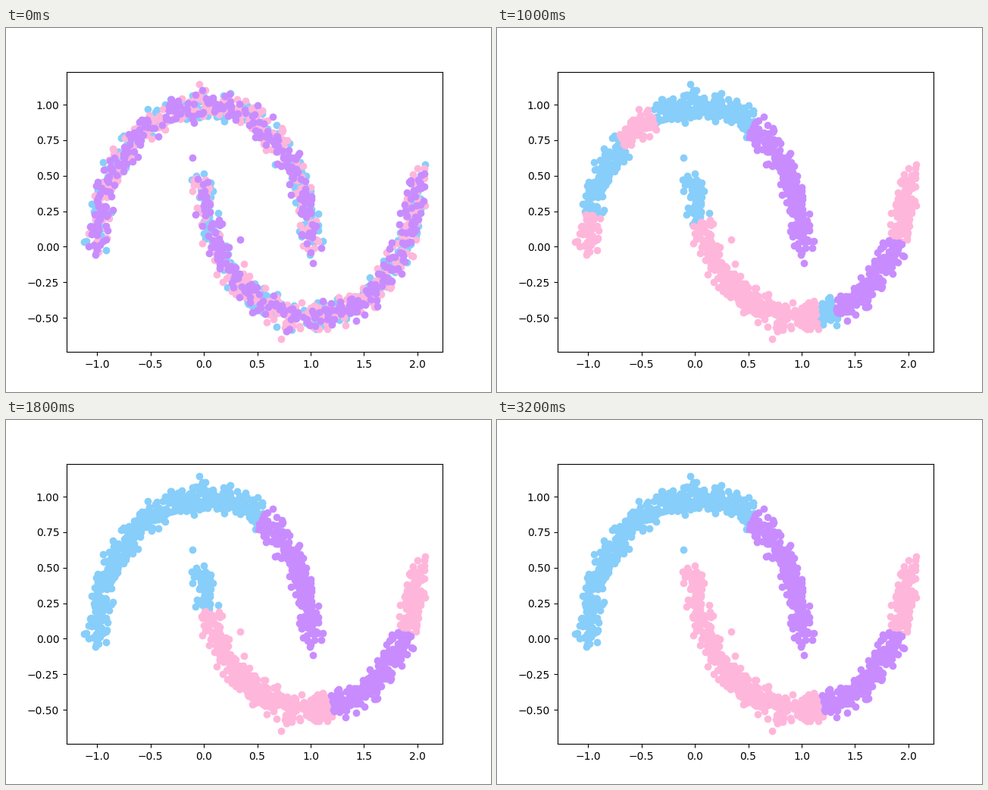
Recreate the animation shown at these times as a matplotlib script. Size 640 px wide and 480 px high, loop 3.4 s.

```python
import numpy as np
import matplotlib.pyplot as plt
from matplotlib.animation import FuncAnimation

FRAMES, INTERVAL = 17, 200
BLUE, PINK, PURPLE = range(3)
COLORS = ["#87cefa", "#ffb6db", "#c88cff"]
XLIM, YLIM = (-1.2853, 2.2349), (-0.7402, 1.2318)
COUNT, NOISE = 750, 0.049

rng = np.random.RandomState(7)


def make_moon(lower, strays):
    """Return a noisy half circle, arched up or (lower) hanging down."""
    t = np.linspace(0, np.pi, COUNT)
    sign = -1 if lower else 1
    points = np.column_stack([lower - np.cos(t),
                              0.5 * lower + sign * np.sin(t)])
    points += rng.normal(scale=NOISE, size=points.shape)
    radius, angle = polar(points, lower)
    inside = (abs(radius - 1) < 0.125) & (abs(angle - 90) < 94)
    inside &= (points[:, 0] > -1.12) & (points[:, 0] < 2.075)
    return np.vstack([points[inside], strays])


def polar(points, lower):
    """Distance from the moon's centre, and degrees from its left tip."""
    dx = lower - points[:, 0]
    dy = 0.5 - points[:, 1] if lower else points[:, 1]
    angle = np.degrees(np.arctan2(dy, dx))
    return np.hypot(dx, dy), (angle + 90) % 360 - 90


def glide(frame, start, end, last, power=2):
    """Move a colour border from start to end degrees, speeding up."""
    progress = np.clip((frame - 1) / (last - 1), 0, 1)
    return start + (end - start) * progress ** power


def upper_borders(frame):
    return [glide(frame, 19.5, -15, 8, 3),
            glide(frame, 40, 56, 7),
            glide(frame, 75, 56, 7),
            glide(frame, 115.5, 122.5, 5)]


def lower_borders(frame):
    return [glide(frame, 19, -5.5, 16, 4),
            glide(frame, 96, 102, 7),
            glide(frame, 114, 102, 7),
            glide(frame, 145, 153.5, 5),
            glide(frame, 158, 153.5, 5)]


upper = make_moon(False, [(-0.04, 1.145), (1.02, -0.115), (-1.12, 0.035)])
lower = make_moon(True, [(-0.11, 0.625), (0.34, 0.05), (0.725, -0.65),
                         (2.07, 0.58)])
points = np.vstack([upper, lower])
upper_angles = polar(upper, False)[1]
lower_angles = polar(lower, True)[1]
upper_colors = np.array([PINK, BLUE, PINK, BLUE, PURPLE])
lower_colors = np.array([BLUE, PINK, BLUE, PURPLE, BLUE, PINK])
random_labels = rng.randint(3, size=len(points))


def labels_at(frame):
    if frame == 0:
        return random_labels
    return np.concatenate([
        upper_colors[np.searchsorted(upper_borders(frame), upper_angles)],
        lower_colors[np.searchsorted(lower_borders(frame), lower_angles)]])


fig, ax = plt.subplots(figsize=(6.4, 4.8), dpi=100)
groups = [ax.scatter([], [], color=color) for color in COLORS]
ax.set(xlim=XLIM, ylim=YLIM)


def update(frame):
    labels = labels_at(frame)
    for index, group in enumerate(groups):
        group.set_offsets(points[labels == index])
    return groups


anim = FuncAnimation(fig, update, frames=FRAMES, interval=INTERVAL,
                     repeat=True, repeat_delay=0)
plt.show()
```
